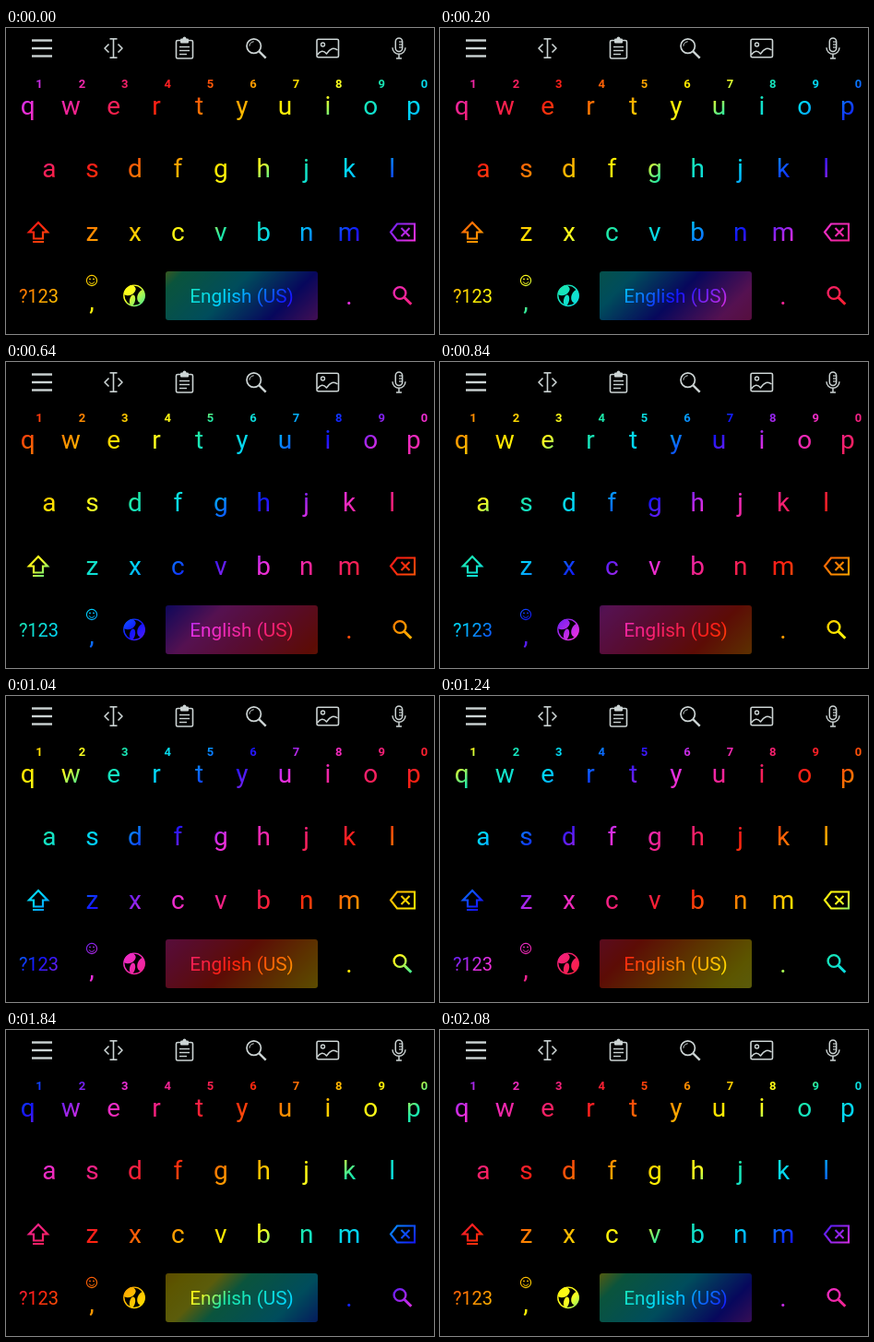
An HTML page with a canvas that plays this animation: 464x332 px, repeating every 2120 ms.

```html
<!DOCTYPE html>
<html lang="en">
<head>
<meta charset="utf-8">
<title>Rainbow keyboard</title>
<style>
html, body { margin: 0; width: 100%; height: 100%; overflow: hidden; background: #000; }
canvas { display: block; position: absolute; left: 0; top: 0; }
</style>
</head>
<body>
<canvas id="keys" width="464" height="332"></canvas>
<canvas id="bar" width="464" height="332"></canvas>
<script>
const W = 464, H = 332, LOOP = 2120, STEP = 40;
const PERIOD = 565, RED_AT = 248, REPEATS = 3;
// colour by its share of one period
const STOPS = {
  0: '#ff2010', 0.12: '#ff8a00', 0.24: '#ffec00', 0.31: '#fbff20', 0.37: '#1de9a8',
  0.5: '#00d4ff', 0.625: '#1414ff', 0.75: '#ec30e0', 0.875: '#f4207c'
};
const FONT = 'Roboto, Arial, sans-serif';
const TAU = Math.PI * 2, SIDES = [-1, 1];

const layer = id => document.getElementById(id).getContext('2d');
const ctx = layer('keys');
const mask = document.createElement('canvas');
mask.width = W;
mask.height = H;
let pen = mask.getContext('2d');

function text(str, x, y, size, weight = 400) {
  pen.font = `${weight} ${size}px ${FONT}`;
  pen.fillText(str, x, y);
}

// strokes an SVG path placed at x, y
function path(x, y, width, d) {
  pen.save();
  pen.translate(x, y);
  pen.lineWidth = width;
  pen.stroke(new Path2D(d));
  pen.restore();
}

function ring(x, y, r, width, from = 0, to = TAU) {
  pen.lineWidth = width;
  pen.beginPath();
  pen.arc(x, y, r, from, to);
  pen.stroke();
}

function oval(x, y, rx, ry = rx, turn = 0) {
  pen.beginPath();
  pen.ellipse(x, y, rx, ry, turn, 0, TAU);
  pen.fill();
}

function box(x, y, w, h, r, width) {
  pen.beginPath();
  pen.roundRect(x, y, w, h, r);
  if (!width) return pen.fill();
  pen.lineWidth = width;
  pen.stroke();
}

function magnifier(x, y, r, width, tail, tailWidth) {
  ring(x, y, r, width);
  const a = r * 0.74;
  path(x, y, tailWidth, `M${a} ${a}L${tail} ${tail}`);
}

function globe(x, y) {
  pen.save();
  pen.translate(x, y);
  ring(0, 0, 11.2, 1.4);
  pen.beginPath();
  pen.arc(0, 0, 11.5, 0, TAU);
  pen.clip();
  oval(-5, -5.5, 7, 5, -0.5);
  oval(-2, 5, 3, 6, 0.2);
  oval(8.5, 1, 5, 7.5, 0.3);
  pen.restore();
}

function drawKeys() {
  pen.fillStyle = pen.strokeStyle = '#fff';
  pen.textAlign = 'center';

  pen.globalAlpha = 0.36;
  box(173, 264, 165, 53, 3);
  pen.globalAlpha = 1;

  ['qwertyuiop', 'asdfghjkl', 'zxcvbnm'].forEach((keys, row) => {
    const left = 232.7 - (keys.length - 1) * 23.22;
    [...keys].forEach((key, i) => text(key, left + i * 46.45, 93.5 + row * 68.6, 28));
  });
  for (let i = 0; i < 10; i++) text((i + 1) % 10, 36 + i * 46.4, 65, 13, 700);

  text('?123', 35.5, 297.5, 20);
  text('English (US)', 255.5, 297.5, 20.8);
  text(',', 93, 306, 28);
  text('.', 372, 300, 28);

  // shift and backspace
  path(35, 211, 2.2, 'M0 0L10 10.5H5V17.5H-5V10.5H-10Z M-6 21H6');
  path(417, 221.5, 2.1, 'M0 0L7-9H26V9H7Z M11.5-4.5l9 9m0-9l-9 9');

  magnifier(427, 287.5, 6.4, 2.4, 12.3, 3);

  // smiley
  ring(93, 274, 5.6, 1.1);
  for (const s of SIDES) oval(93 + s * 2, 272.4, 0.9);
  ring(93, 274.4, 3, 1, 0.3, Math.PI - 0.3);

  globe(139, 290.3);
}

function drawBar() {
  pen.strokeStyle = pen.fillStyle = '#ccd4d4';
  pen.lineJoin = 'round';

  for (const s of [-1, 0, 1]) path(39, 22 + s * 8.5, 2.4, 'M-11 0H11');

  // text cursor
  path(116.5, 22, 1.6, 'M0-10V10');
  for (const s of SIDES) {
    path(116.5, 22 + s * 10.2, 1.6, 'M-4 0H4');
    path(116.5, 22, 1.6, `M${s * 5}-4.5L${s * 9.5} 0L${s * 5} 4.5`);
  }

  // clipboard
  box(184.5, 13.5, 18, 19.5, 1.5, 1.6);
  box(189, 11.5, 9, 5, 1);
  oval(193.5, 11.5, 2);
  for (let i = 0; i < 3; i++) path(188, 20.5 + i * 4, 1.4, `M0 0H${i < 2 ? 11 : 8}`);

  magnifier(268.7, 19.6, 7.7, 1.7, 13, 2.4);
  ring(268.7, 19.6, 4.8, 1, Math.PI, Math.PI * 1.5);

  // picture
  box(337, 12.3, 23.5, 19.5, 1.5, 1.6);
  ring(343.5, 18, 2, 1.4);
  path(337.5, 29, 1.5, 'M0 0Q5-7 10-1Q16-10 22-5');

  // microphone
  box(422.3, 11, 7.4, 14.5, 3.7, 1.5);
  for (let i = 0; i < 3; i++) path(426, 15 + i * 3, 1.2, 'M0 0H3');
  ring(426, 21.3, 7, 1.4, 0, Math.PI);
  path(426, 28.5, 1.5, 'M0 0V4.5M-3 4.5H3');
}

// diagonal rainbow, constant along x + y
function rainbow(shift) {
  const a = (RED_AT - PERIOD - shift) / 2, b = a + PERIOD * REPEATS / 2;
  const g = ctx.createLinearGradient(a, a, b, b);
  for (let i = 0; i < REPEATS; i++)
    for (const at in STOPS) g.addColorStop((i + Number(at)) / REPEATS, STOPS[at]);
  g.addColorStop(1, STOPS[0]);
  return g;
}

function draw(ms) {
  const t = Math.floor((ms % LOOP) / STEP) * STEP;
  ctx.globalCompositeOperation = 'copy';
  ctx.drawImage(mask, 0, 0);
  ctx.globalCompositeOperation = 'source-in';
  ctx.fillStyle = rainbow(PERIOD * t / LOOP);
  ctx.fillRect(0, 0, W, H);
}

drawKeys();
pen = layer('bar');
drawBar();

let start;
function tick(now) {
  start ??= now;
  draw(Math.max(0, now - start));
  requestAnimationFrame(tick);
}
draw(0);
requestAnimationFrame(tick);
</script>
</body>
</html>
```
